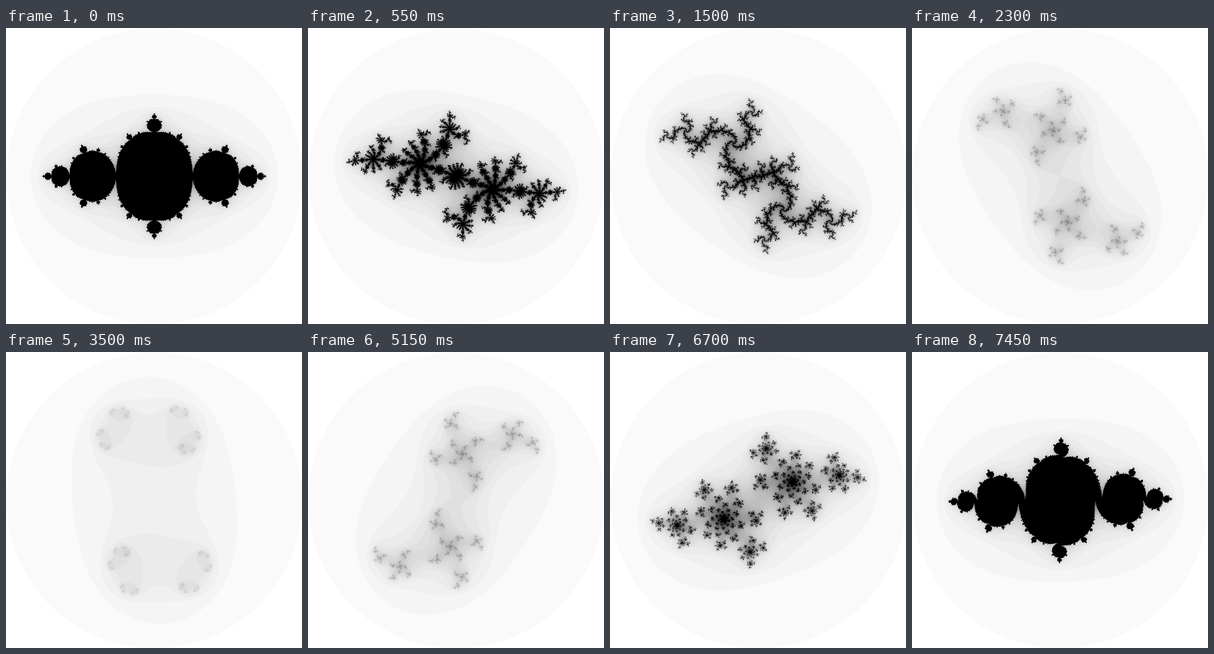
These frames come from a looping animation (500x500 px, 7.5 s). An HTML page with a canvas:

```html
<!DOCTYPE html>
<html lang="en">
<head>
<meta charset="utf-8">
<title>Julia sets</title>
<style>
html, body { margin: 0; width: 100%; height: 100%; overflow: hidden; background: #fff; }
canvas { display: block; width: 500px; height: 500px; }
</style>
</head>
<body>
<canvas id="stage" width="500" height="500"></canvas>
<script>
const SIZE = 500, HALF = SIZE / 2, UNIT = 125;
const STEPS = 150, STEP_MS = 50;
const RADIUS = 0.7885, MAX_ITER = 50;

const ctx = document.getElementById('stage').getContext('2d');
const image = ctx.createImageData(SIZE, SIZE);
const pixels = new Uint32Array(image.data.buffer);

// Opaque grey for each escape count, white to black.
const shades = Uint32Array.from({ length: MAX_ITER + 1 }, (_, n) => {
  const g = Math.round(255 * (1 - n / MAX_ITER));
  return (0xff000000 | g << 16 | g << 8 | g) >>> 0;
});

function escapeCount(x, y, cx, cy) {
  let n = 0, xx = x * x, yy = y * y;
  while (n < MAX_ITER && xx + yy <= 4) {
    y = 2 * x * y + cy;
    x = xx - yy + cx;
    xx = x * x;
    yy = y * y;
    n++;
  }
  return n;
}

function drawJulia(cx, cy) {
  // The set is symmetric under z -> -z, so each value fills two pixels.
  for (let py = 0; py <= HALF; py++) {
    for (let px = 0; px < SIZE; px++) {
      const n = escapeCount((px - HALF) / UNIT, (py - HALF) / UNIT, cx, cy);
      pixels[py * SIZE + px] = shades[n];
      if (px && py) pixels[(SIZE - py) * SIZE + SIZE - px] = shades[n];
    }
  }
  ctx.putImageData(image, 0, 0);
}

const start = performance.now();
let shown = -1;

function tick() {
  const step = Math.floor((performance.now() - start) / STEP_MS) % STEPS;
  if (step !== shown) {
    shown = step;
    const angle = 2 * Math.PI * step / STEPS;
    drawJulia(-RADIUS * Math.cos(angle), -RADIUS * Math.sin(angle));
  }
  requestAnimationFrame(tick);
}
tick();
</script>
</body>
</html>
```
